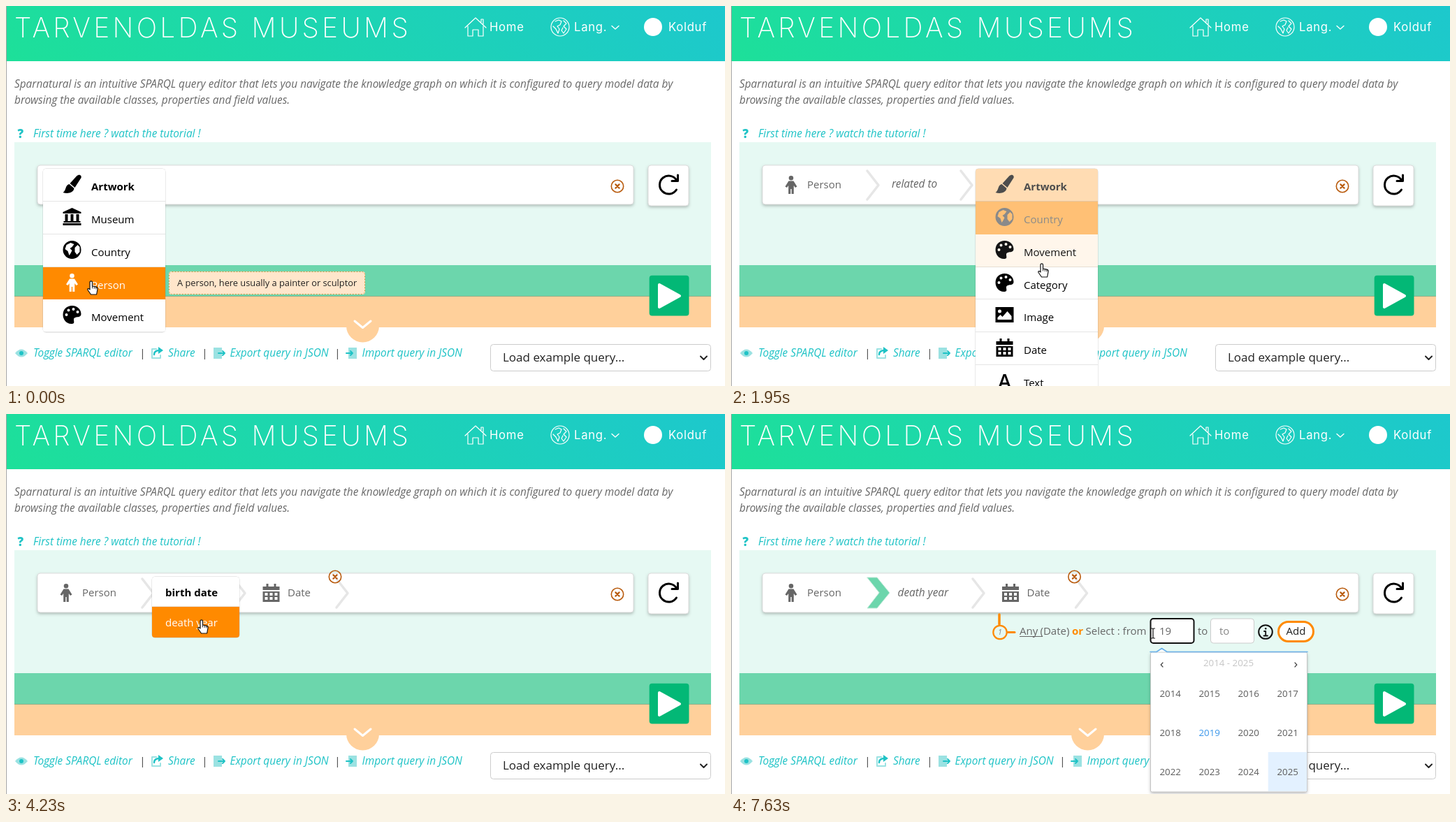
Write an HTML page with a canvas that moves like this. It is 1029 px wide and 544 px high and loops after 8 s.

```html
<!DOCTYPE html>
<html lang="en">
<head>
<meta charset="utf-8">
<title>Query builder</title>
<style>
html, body { margin: 0; width: 100%; height: 100%; overflow: hidden; background: #fff; }
canvas { display: block; }
</style>
</head>
<body>
<canvas id="stage" width="1029" height="544"></canvas>
<script>
const ctx = document.getElementById('stage').getContext('2d');
const LOOP = 8000, SIZE = 15;
const SANS = '"Open Sans", "Noto Sans", sans-serif', HEAD = 'Inter, "Open Sans", sans-serif';
const ITALIC = { style: 'italic', size: 15.42 };
const ORANGE = [255, 138, 0], WHITE = [255, 255, 255], GREY = [102, 102, 102], BLACK = [0, 0, 0];
const TEAL = '#1fc3c6', PALE = '#9be2e2', RUST = '#b85a0c', HOT = '#ff8a00';

// The picture only changes at these moments.
const TICKS = [0, 400, 520, 670, 1230, 1370, 1510, 1660, 1800, 1950, 2100, 2230,
  2350, 2500, 2640, 2780, 2920, 3200, 3330, 3450, 3580, 3700, 3830,
  4110, 4230, 4350, 4490, 4630, 4770, 4900, 5040,
  5190, 5330, 5470, 5600, 5730, 5880, 6310, 6730, 7100, 7630];

// time, x, y, kind
const POINTER = [
  [0, 122, 394, 'hand'], [520, 122, 394, 'arrow'], [1230, 170, 345, 'arrow'],
  [1370, 270, 240, 'arrow'], [1510, 370, 171, 'arrow'], [1660, 430, 250, 'hand'],
  [1800, 446, 310, 'hand'], [1950, 445, 369, 'hand'], [2100, 432, 440, 'hand'],
  [2230, 422, 498, 'hand'], [3200, 402, 466, 'arrow'], [3330, 370, 412, 'arrow'],
  [3450, 334, 356, 'arrow'], [3580, 300, 313, 'hand'], [3700, 284, 299, 'hand'],
  [3830, 280, 295, 'hand'], [4350, 280, 295, 'arrow'], [4630, 300, 300, 'arrow'],
  [4770, 340, 306, 'arrow'], [4900, 385, 310, 'arrow'], [5040, 423, 312, 'hand'],
  [5190, 450, 313, 'arrow'], [5330, 510, 314, 'arrow'], [5470, 570, 314, 'arrow'],
  [5600, 604, 314, 'beam']
];
const CLICKS = [400, 2350, 4110, 5730];

const clamp = v => Math.max(0, Math.min(1, v));
const mix = (a, b, k) => `rgb(${a.map((v, i) => Math.round(v + (b[i] - v) * k))})`;
const last = (list, t, key = v => v) => list.filter(v => key(v) <= t).pop();
const dot = (x, y, r) => `M${x - r},${y}a${r},${r} 0 1 1 ${2 * r},0a${r},${r} 0 1 1 ${-2 * r},0Z`;
const box = (x, y, w, h) => `M${x},${y}h${w}v${h}h${-w}Z`;

const calHoles = [-9, -2, 5].map(x => box(x, 0, 4, 4) + box(x, 6, 4, 4)).join('');
const ICONS = {
  Artwork: 'M9,-13C12,-14 14,-11 13,-9L4,5 -3,-1 7,-12ZM-4,0L3,6C2,13 -7,14 -13,12C-8,9 -10,1 -4,0Z',
  Museum: 'M0,-13L13,-7V-5H-13V-7Z' + [-10, -2, 6].map(x => box(x, -4, 4, 10)).join('') +
    box(-12, 6, 24, 2) + box(-13, 9, 26, 3),
  Country: dot(0, 0, 13) + 'M-8,-7L-2,-10 3,-8 0,-4 -3,-2 0,1 -2,5 -4,8 -6,2 -10,-1ZM4,-3L8,-7 11,-4 11,3 7,7 4,3Z',
  Person: dot(0, -9.8, 3.3) + 'M-3.5,-5.5H3.5L8.5,2.5 6,4 3.8,1V13H.7V6H-.7V13H-3.8V1L-6,4 -8.5,2.5Z',
  Movement: 'M0,-13C8,-13 13,-7 13,-1C13,5 5,2 3,5C1,8 6,13 -1,13C-9,13 -13,6 -13,0C-13,-8 -7,-13 0,-13Z' +
    dot(-8, 0, 2) + dot(-5, -6.5, 2) + dot(2, -8, 2) + dot(8, -4, 2),
  Image: box(-13, -11, 26, 22) + dot(-7, -5, 2.5) + 'M-10,7V4L-6,0 -3,3 4,-5 10,2V7Z',
  Date: box(-12, -9, 24, 5) + box(-7, -13, 3, 4) + box(4, -13, 3, 4) + box(-12, -2, 24, 15) + calHoles
};
ICONS.Category = ICONS.Movement;

const POINTERS = {
  hand: 'M-2,1.5C-2,-.6 1.5,-.6 1.5,1.5V7L7,8.2C9,8.7 9.3,10 9,11.5L7.6,19H-.5L-5,12.5C-5.8,10.5 -3.6,9.8 -2,12Z',
  arrow: 'M0,0V14L3.2,11 5.4,16 7.7,15 5.5,10.2H10Z'
};

function text(s, x, y, color, { size = SIZE, style = '', font = SANS, align = 'left', gap = 0 } = {}) {
  ctx.font = `${style} ${size}px ${font}`;
  ctx.letterSpacing = gap + 'px';
  ctx.textAlign = align;
  ctx.fillStyle = color;
  ctx.fillText(s, x, y);
}

function rect(x, y, w, h, color) {
  ctx.fillStyle = color;
  ctx.fillRect(x, y, w, h);
}

function card(x, y, w, h, r, fill, edge, width = 1, shadow = 0) {
  ctx.save();
  if (shadow) {
    ctx.shadowColor = 'rgba(0,0,0,.28)';
    ctx.shadowBlur = shadow;
    ctx.shadowOffsetY = shadow / 2;
  }
  ctx.beginPath();
  ctx.roundRect(x, y, w, h, r);
  ctx.fillStyle = fill;
  ctx.fill();
  ctx.restore();
  if (edge) {
    ctx.strokeStyle = edge;
    ctx.lineWidth = width;
    ctx.stroke();
  }
}

function shape(d, x, y, { fill, stroke, width = 1 }) {
  const p = new Path2D(d);
  ctx.save();
  ctx.translate(x, y);
  ctx.lineJoin = ctx.lineCap = 'round';
  if (fill) { ctx.fillStyle = fill; ctx.fill(p, 'evenodd'); }
  if (stroke) { ctx.strokeStyle = stroke; ctx.lineWidth = width; ctx.stroke(p); }
  ctx.restore();
}

const line = (d, stroke, width, x = 0, y = 0) => shape(d, x, y, { stroke, width });

function icon(name, x, y, color) {
  if (name === 'Text') text('A', x, y + 12, color, { size: 29, style: '600', align: 'center' });
  else shape(ICONS[name], x, y, { fill: color });
}

function closer(x, y) {
  line(dot(0, 0, 8.7), RUST, 1.6, x, y);
  line('M-2.6,-2.6L2.6,2.6M2.6,-2.6L-2.6,2.6', RUST, 2.2, x, y);
}

function header() {
  const g = ctx.createLinearGradient(237, 317, 791, -237);
  g.addColorStop(0, '#1de099');
  g.addColorStop(1, '#1dc8cd');
  rect(0, 0, 1029, 79, g);
  rect(0, 0, 1, 544, '#a5a5a5');
  text('TARVENOLDAS MUSEUMS', 12, 45, '#fff', { size: 39, style: '200', font: HEAD, gap: 4.3 });

  const nav = { size: 16.7, font: HEAD, gap: 0.7 };
  line('M657,31L672,17 687,31M661,29V43H668V34H676V43H683V29M680,23V19H683V26', '#fff', 1.2);
  text('Home', 692, 36, '#fff', nav);
  line(dot(0, 0, 13) + 'M-7,-8L-2,-10 2,-8 0,-3 -4,-1 -1,3 -3,9 -6,3 -10,-1M5,-9L9,-5 5,-1 9,3 5,9 2,5 4,1', '#fff', 1.2, 793, 30);
  text('Lang.', 813, 36, '#fff', nav);
  line('M867,28.5L872,33 877,28.5', '#fff', 1.4);
  shape(dot(926, 30, 13), 0, 0, { fill: '#fff' });
  text('Kolduf', 948, 36, '#fff', nav);
}

function links() {
  text('Toggle SPARQL editor', 39, 502, TEAL, ITALIC);
  text('Share', 232, 502, TEAL, ITALIC);
  text('Export query in JSON', 320.5, 502, TEAL, ITALIC);
  text('Import query in JSON', 509.5, 502, TEAL, ITALIC);
  for (const x of [195.5, 284.5, 474.5]) text('|', x, 502, '#444', { align: 'center' });

  shape('M13,497Q22,486 31,497Q22,508 13,497Z', 0, 0, { fill: PALE });
  shape(dot(22, 497, 3), 0, 0, { fill: TEAL });
  line('M215,491H209V504H221V500', PALE, 2);
  line('M212,499Q212,493 220,493', TEAL, 2.4);
  shape('M218,488L225,493 218,498Z', 0, 0, { fill: TEAL });
  for (const [x, ax] of [[297, 304], [490, 487]]) {
    rect(x, 489, 12, 16, PALE);
    line('M0,497H9M6,494L9,497 6,500', TEAL, 2, ax, 0);
  }
}

function page() {
  rect(0, 0, 1029, 544, '#fff');
  header();
  text('Sparnatural is an intuitive SPARQL query editor that lets you navigate the knowledge graph on which it is configured to query model data by', 12, 117, '#696969', ITALIC);
  text('browsing the available classes, properties and field values.', 12, 140, '#696969', ITALIC);
  text('?', 16.5, 189, TEAL, { style: '800', size: 17 });
  text('First time here ? watch the tutorial !', 39, 188, TEAL, ITALIC);

  rect(12, 195, 997, 176, '#e6f9f3');
  rect(12, 371, 997, 45, '#6cd6ac');
  shape(dot(510.5, 458, 23.5), 0, 0, { fill: '#ffd09b' });
  rect(12, 416, 997, 44, '#ffd09b');
  rect(12, 415, 997, 1, '#8eae88');
  line('M499,451L510.5,460.5 522,451', '#fff', 3);

  card(45, 228, 853, 56, 4, '#fff', '#ddd', 1, 4);
  closer(875, 258);
  card(919, 228, 58, 58, 4, '#fff', '#ddd', 1, 4);
  line('M960,250A13,13 0 1 0 959.5,263', '#000', 3);
  line('M961.5,242V250.5H953', '#000', 3);
  card(920.7, 385.7, 56.8, 57.8, 4, '#03b876');
  shape('M935,399L964,415 935,431Z', 0, 0, { fill: '#fff', stroke: '#fff', width: 4 });

  links();
  card(693.5, 484.5, 315, 38, 4, '#fff', '#ccc');
  text('Load example query...', 711, 509, '#222', { size: 17 });
  line('M994,501.5L998.5,506 1003,501.5', '#222', 2);
}

const chevron = x => line('M0,236L16,256.5 0,277', '#e6e6e6', 3.5, x, 0);

function bar(t) {
  if (t < 520) return;
  icon('Person', 86, 256, '#666');
  text('Person', 109, 261, '#666');
  if (t < 4350) {
    chevron(195);
    chevron(t < 2500 ? 329 : 326);
    if (t < 2500) text('related to', 230, 260, '#666', ITALIC);
  } else {
    shape('M195,234H209L227,256 209,278H195L212,256Z', 0, 0, { fill: '#6cd6ac', stroke: '#bfe9d8' });
    text('death year', 238.5, 261, '#666', ITALIC);
    chevron(346);
  }
  if (t < 2500) return;
  const dx = t < 4350 ? 0 : 20.5;
  icon('Date', 379.5 + dx, 256, '#666');
  text('Date', 403 + dx, 261, '#666');
  chevron(473 + dx);
  closer(471 + dx, 233);
}

// Drop-down list; "leaving" shrinks and fades it as it closes.
function menu(x, w, rowH, items, heat, ink, icons, leaving) {
  const top = i => Math.round(233 + i * rowH);
  ctx.save();
  if (leaving) {
    const k = 0.979;
    ctx.globalAlpha = 0.65;
    ctx.translate(x + w / 2, 233);
    ctx.scale(k, k);
    ctx.translate(-x - w / 2, -233 - 1.8);
  }
  ctx.beginPath();
  ctx.roundRect(x, 233, w, top(items.length) - 233, 4);
  ctx.strokeStyle = 'rgba(68,68,68,.22)';
  ctx.lineWidth = 1;
  ctx.stroke();
  ctx.clip();
  items.forEach((name, i) => {
    const y = top(i), end = top(i + 1), color = mix(ink, WHITE, heat[i]);
    rect(x, y, w, end - y, mix(WHITE, ORANGE, heat[i]));
    if (heat[i] < 0.5) rect(x, end - 1, w, 1, 'rgba(0,0,0,.1)');
    if (icons) icon(name, x + 41.5, y + 22, color);
    text(name, x + (icons ? 69 : 19), y + (icons ? 30.5 : 27.5), color, { style: i ? '' : 'bold' });
  });
  ctx.restore();
}

// Hover strength of each row, given when the pointer entered each one.
const heats = (t, enter) => enter.map((on, i) => {
  const off = enter[i + 1] ?? Infinity;
  return clamp(clamp((Math.min(t, off) - on) / 300) - Math.max(0, (t - off) / 300));
});

function menus(t) {
  if (t < 670) {
    menu(53, 175, 46.85, ['Artwork', 'Museum', 'Country', 'Person', 'Movement'], [0, 0, 0, 1, 0], BLACK, true, t >= 520);
  }
  if (t >= 520 && t < 2640) {
    const names = ['Artwork', 'Country', 'Movement', 'Category', 'Image', 'Date', 'Text'];
    const heat = t < 1660 ? [1, 0, 0, 0, 0, 0] : heats(t, [0, 1740, 1926, 2000, 2070, 2150]);
    menu(350, 175, 46.85, names, heat.concat(0), t < 1660 ? GREY : BLACK, true, t >= 2500);
  }
  if (t >= 2500 && t < 4490) {
    menu(209, 125, 43.4, ['birth date', 'death year'], heats(t, [0, 3520]), t < 3580 ? GREY : BLACK, false, t >= 4350);
  }
  if (t < 520) {
    card(233, 380, 281, 33, 4, '#ffe6cb');
    ctx.setLineDash([2, 2]);
    card(233.5, 380.5, 280, 32, 4, 'transparent', '#d9953f');
    ctx.setLineDash([]);
    text('A person, here usually a painter or sculptor', 245, 401, '#222', { size: 12.8 });
  }
}

function filterRow(t) {
  if (t < 4490) return;
  ctx.save();
  ctx.globalAlpha = clamp((t - 4400) / 200);
  line('M384,287V301', HOT, 3.5);
  line('M396,312.5H406', HOT, 3);
  line(dot(385, 312.5, 9.7), HOT, 2.2);
  text('1', 385, 316, '#888', { size: 10.5, style: 'italic', align: 'center' });
  text('Any', 413, 316, '#666');
  rect(413, 318, 33, 1, '#666');
  text('(Date)', 442.5, 316, '#666');
  text('or', 488, 316, HOT, { style: 'bold' });
  text('Select : from', 507.5, 316, '#666');
  text('to', 668, 316, '#666');

  const focus = t >= 5730, typed = t < 6730 ? '' : t < 7100 ? '1' : '19';
  card(600.5, 293, 62, 35, 4, '#fff', focus ? '#111' : '#ccc', focus ? 2 : 1);
  text(typed || 'from', 613, 316, typed ? '#666' : '#888');
  card(686.5, 293, 62, 35, 4, '#fff', '#ccc');
  text('to', 699, 316, '#888');
  if (focus && !(t >= 6310 && t < 6730) && t < 7630) rect(613 + 8.2 * typed.length, 300, 1, 21, '#333');

  line(dot(765, 312, 9.8), '#111', 2);
  rect(764, 306, 2.4, 2.4, '#111');
  line('M763,311H765.2V317M762.5,317.5H768', '#111', 1.8);
  card(783.5, 297.5, 50, 28, 14, '#fff', HOT, 3);
  text('Add', 794.5, 316, '#222');
  ctx.restore();
}

function picker(t) {
  if (t < 5730) return;
  const year = t < 6730 ? 2025 : t < 7100 ? 2001 : 2019, first = year - 5;
  card(600.5, 341, 224, 200, 2, '#fff', '#c4c4c4', 1, 4);
  shape('M600,340.5H609L616.5,335.5 624,340.5H825', 0, 0, { fill: '#fff', stroke: '#6ab1ea', width: 1.6 });
  text(`${first} - ${first + 11}`, 712, 361, '#c6c6c6', { size: 13.3, align: 'center' });
  line('M618,356L615.2,359 618,362M807,356L809.8,359 807,362', '#444', 1.2);
  for (let i = 0; i < 12; i++) {
    const x = 628.7 + (i % 4) * 56, y = 400 + Math.floor(i / 4) * 56, n = first + i;
    if (n === 2025) rect(x - 28, y - 28, 55.5, 56, '#e3f1ff');
    text(n, x, y + 4.5, n === year ? '#3996ea' : '#5c5c5c', { size: 13.3, align: 'center' });
  }
}

function pointer(t) {
  const [, x, y, kind] = last(POINTER, t, k => k[0]);
  if (kind === 'beam') {
    line('M-2.5,-7H-.8L0,-6 .8,-7H2.5M0,-6V6M-2.5,7H-.8L0,6 .8,7H2.5', '#111', 1.2, x, y);
  } else {
    shape(POINTERS[kind], x, y, { fill: '#fff', stroke: '#111', width: 1.2 });
    if (kind === 'hand') line('M1.5,7V10M4.2,8V10.5M6.8,8.5V11', '#111', 0.9, x, y);
  }
  if (CLICKS.includes(t)) line(dot(0, 0, 8.5), '#555', 1, kind === 'beam' ? x - 1 : x, y);
}

function frame(now) {
  const t = last(TICKS, now % LOOP);
  for (const part of [page, bar, filterRow, menus, picker, pointer]) part(t);
  requestAnimationFrame(() => frame(performance.now() - start));
}

const start = performance.now();
frame(0);
</script>
</body>
</html>
```
